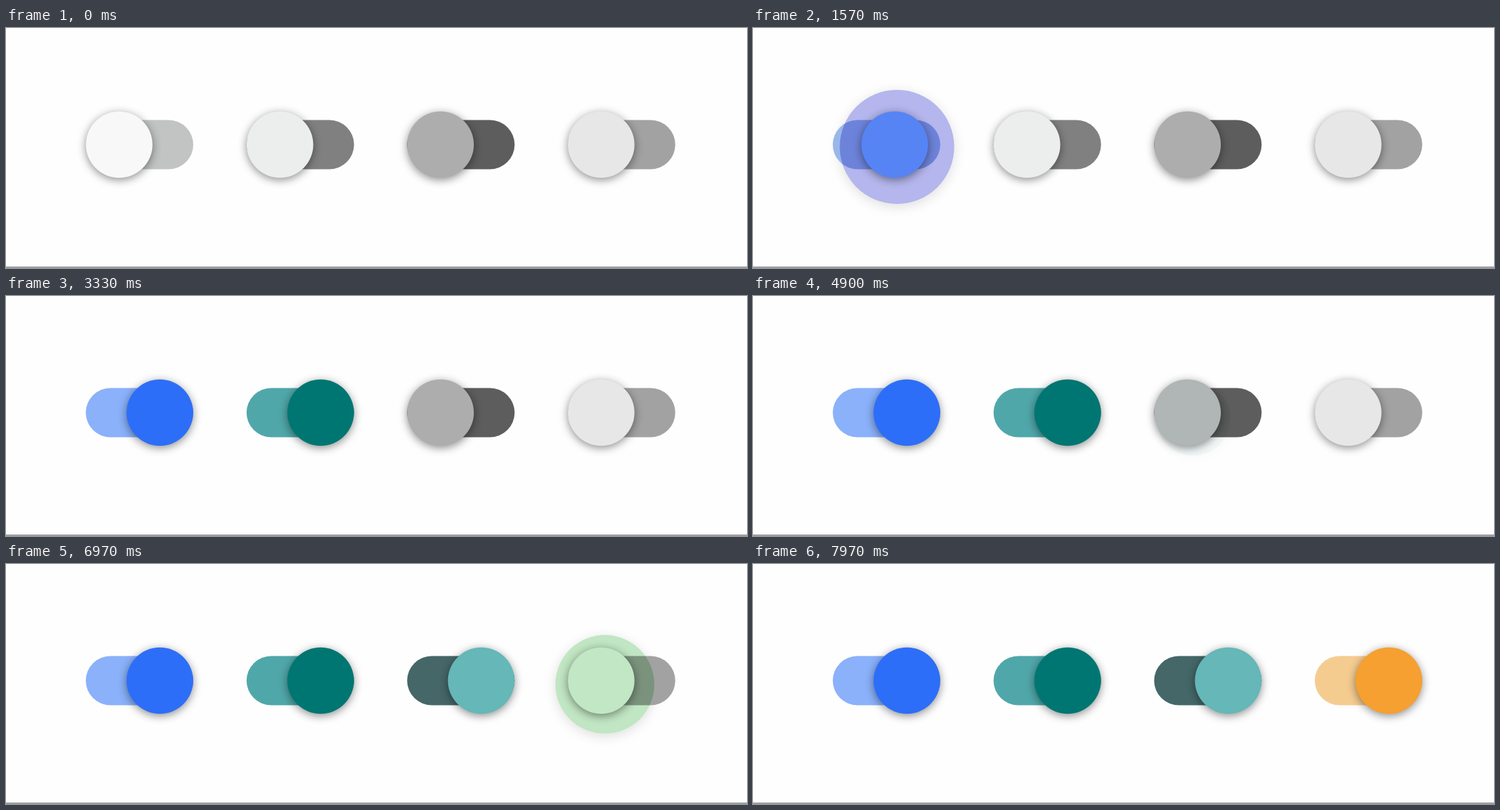
Animation, 1096 px wide and 356 px high, one loop 8 s. Source, as an HTML page with a canvas:

```html
<!DOCTYPE html>
<html lang="en">
<head>
<meta charset="utf-8">
<title>Toggle switches</title>
<style>
  html, body { margin: 0; width: 100%; height: 100%; overflow: hidden; background: #fefefe; }
  canvas { display: block; width: 1096px; height: 356px; }
</style>
</head>
<body>
<canvas width="1096" height="356"></canvas>
<script>
const ctx = document.querySelector('canvas').getContext('2d');
const LOOP = 8000;
const CY = 173, THUMB_R = 49.3, TRAVEL = 60.2;
const TRACK = { w: 159, h: 73 };
const MOVE_MS = 270, FADE_MS = 350, TINT_MS = 110;
const RIPPLE_MIN = 40, RIPPLE_MAX = 128;

// press / release in ms; thumb and track colours are [off, on]
const switches = [
  { x: 118, press: 1000, release: 1450, peak: 80, ripple: [181, 183, 238],
    thumb: [[248, 248, 248], [45, 110, 248]], track: [[193, 196, 195], [138, 177, 250]] },
  { x: 355.8, press: 2730, release: 2835, peak: 68, ripple: [199, 202, 201],
    thumb: [[236, 238, 237], [0, 118, 114]], track: [[128, 128, 128], [80, 167, 169]] },
  { x: 593.3, press: 4880, release: 4965, peak: 70, ripple: [190, 214, 213],
    thumb: [[173, 173, 173], [101, 183, 184]], track: [[93, 93, 93], [69, 103, 104]] },
  { x: 830.9, press: 6570, release: 7450, peak: 84, ripple: [194, 231, 196],
    thumb: [[231, 231, 231], [245, 160, 48]], track: [[162, 162, 162], [245, 204, 144]] }
];

const clamp = v => Math.min(1, Math.max(0, v));
const lerp = (a, b, p) => a + (b - a) * p;
const mix = (a, b, p) => a.map((v, i) => lerp(v, b[i], p));
const rgb = c => `rgb(${c.map(Math.round).join(',')})`;

// cubic-bezier(.4, 0, .2, 1)
function ease(x) {
  let lo = 0, hi = 1;
  for (let i = 0; i < 20; i++) {
    const s = (lo + hi) / 2;
    const bx = 1.2 * s * (1 - s) ** 2 + 0.6 * s * s * (1 - s) + s ** 3;
    if (bx < x) lo = s; else hi = s;
  }
  return lo * lo * (3 - 2 * lo);
}

function disc(x, y, r, fill) {
  ctx.fillStyle = fill;
  ctx.beginPath();
  ctx.arc(x, y, r, 0, Math.PI * 2);
  ctx.fill();
}

function shadow(alpha, blur, dy) {
  ctx.shadowColor = `rgba(0,0,0,${alpha})`;
  ctx.shadowBlur = blur;
  ctx.shadowOffsetY = dy;
}

function rippleAt(s, t) {
  if (t < s.press || t >= s.release + FADE_MS) return null;
  const grow = clamp((t - s.press) / (s.release - s.press));
  const out = clamp((t - s.release) / FADE_MS);
  const held = lerp(RIPPLE_MIN, s.peak, 1 - (1 - grow) ** 2.3);
  const r = lerp(held, RIPPLE_MAX, out ** 2.2);
  const alpha = clamp((t - s.press) / TINT_MS) * clamp((1 - out) / 0.6) ** 1.5;
  // the centre drifts up and left as the ripple widens
  return { r, alpha, shift: 19 - 0.185 * r };
}

function drawSwitch(s, t) {
  const p = ease(clamp((t - s.release) / MOVE_MS));
  const tint = clamp((t - s.press) / TINT_MS);
  const cx = s.x + THUMB_R + 0.1 + TRAVEL * p;
  const ripple = rippleAt(s, t);

  if (ripple) {
    ctx.save();
    shadow(0.13 * ripple.alpha, 18, 4);
    disc(cx + ripple.shift, CY + ripple.shift, ripple.r, '#fefefe');
    ctx.restore();
  }

  ctx.fillStyle = rgb(mix(s.track[0], s.track[1], p));
  ctx.beginPath();
  ctx.roundRect(s.x, CY - TRACK.h / 2, TRACK.w, TRACK.h, TRACK.h / 2);
  ctx.fill();

  if (ripple) {
    ctx.save();
    ctx.globalCompositeOperation = 'multiply';
    ctx.globalAlpha = ripple.alpha;
    disc(cx + ripple.shift, CY + ripple.shift, ripple.r, rgb(s.ripple));
    ctx.restore();
  }

  ctx.save();
  shadow(0.45, 13, 3);
  disc(cx, CY, THUMB_R, rgb(mix(mix(s.thumb[0], s.ripple, tint), s.thumb[1], p)));
  ctx.restore();
}

function draw(t) {
  ctx.fillStyle = '#fefefe';
  ctx.fillRect(0, 0, 1096, 356);
  for (const s of switches) drawSwitch(s, t);
  ctx.fillStyle = '#777';
  ctx.fillRect(0, 354, 1096, 1.5);
}

const start = performance.now();
function tick() {
  draw((performance.now() - start) % LOOP);
  requestAnimationFrame(tick);
}
tick();
</script>
</body>
</html>
```
